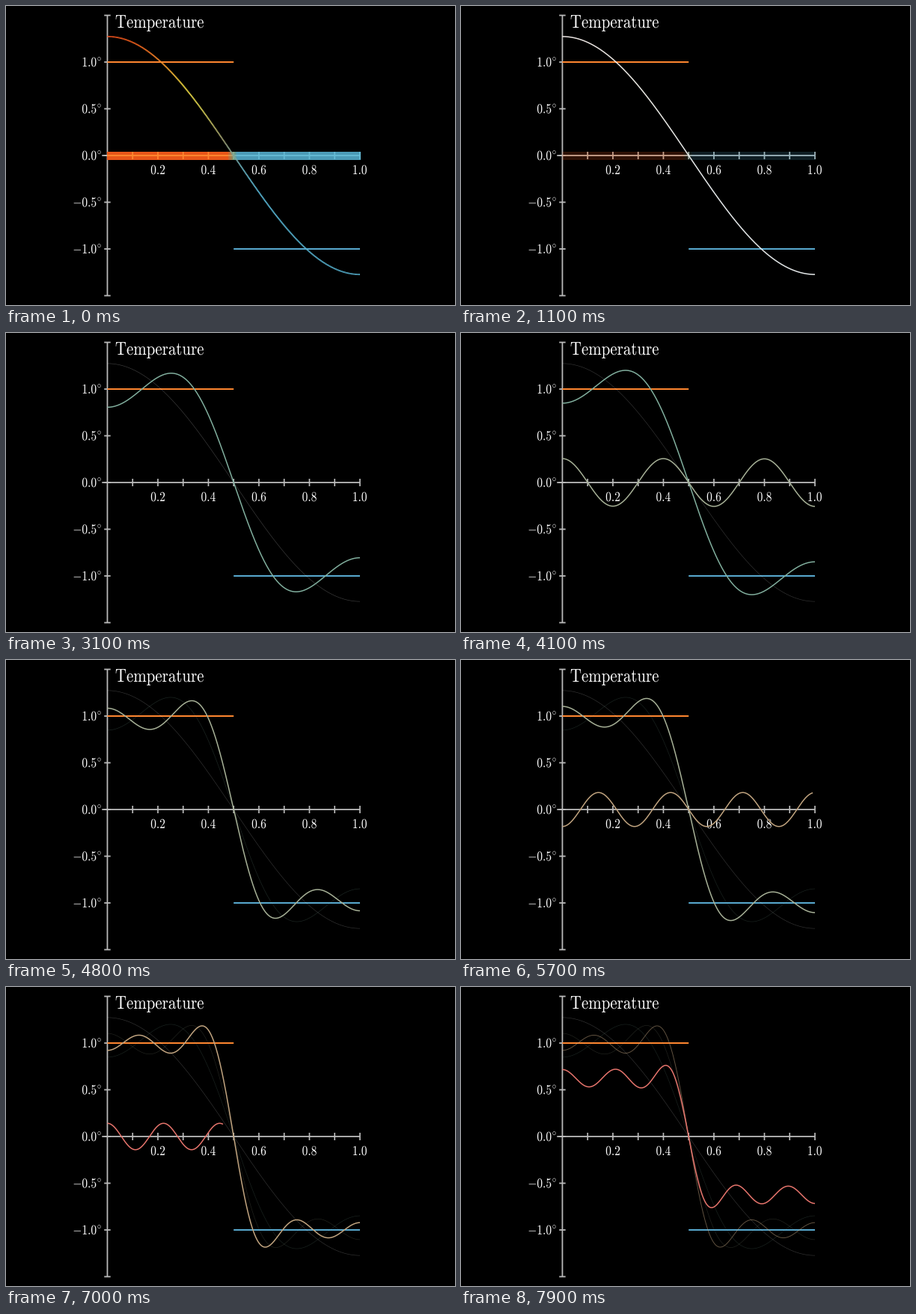
A matplotlib script that plays this animation: 600 px wide and 400 px high, repeating every 8 s.

```python
import numpy as np
import matplotlib as mpl
import matplotlib.pyplot as plt
from matplotlib.animation import FuncAnimation
from matplotlib.collections import LineCollection
from matplotlib.colors import to_rgb
from matplotlib.patches import PathPatch
from matplotlib.textpath import TextPath
from matplotlib.transforms import Affine2D

mpl.rcParams["mathtext.fontset"] = "cm"

FRAMES, STEP = 80, 100
X0, XLEN, YUNIT = -3.9, 8.0, 2.5
ORANGE, BLUE, GREY = "#FF862F", "#58A9CF", "#BBBBBB"
COLORS = ["#FFFFFF", "#82B09F", "#A8B298", "#C2A580", "#E8756D"]
DIM_ALPHA, DIM_WIDTH, WIDTH = 0.2, 0.65, 1.5

# A 16:9 scene, eight units high, shown on a 3:2 stage
fig = plt.figure(figsize=(6, 4), dpi=100, facecolor="black")
ax = fig.add_axes([0, 0, 1, 1])
ax.set_xlim(-64 / 9, 64 / 9)
ax.set_ylim(-4, 4)
ax.axis("off")


def px(n):
    return n * 0.72


def sx(x):
    return X0 + XLEN * np.asarray(x, float)


def sy(y):
    return YUNIT * np.asarray(y, float)


def scene_time(i):
    """Seconds since the second cosine began, on a 30 fps clock run at 1.2x."""
    ticks = -(-18 * (i - 19) // 5)
    return (ticks + 10.5) / 30


def smooth(t):
    t = np.clip(t, 0, 1)
    sig = lambda v: 1 / (1 + np.exp(-v))
    low = sig(-5)
    return float(np.clip((sig(10 * (t - 0.5)) - low) / (1 - 2 * low), 0, 1))


def line(x, y, color, width, z):
    return ax.plot(x, y, color=color, lw=px(width), zorder=z, snap=False,
                   solid_capstyle="butt", solid_joinstyle="round")[0]


def blend(x, stops):
    pos = [p for p, _ in stops]
    rgb = np.array([to_rgb(c) for _, c in stops])
    return np.stack([np.interp(x, pos, rgb[:, i]) for i in range(3)], axis=1)


def gradient_line(x, y, stops, width, z, smooth_edges=True):
    pts = np.stack([sx(x), sy(y)], axis=1)
    segs = np.stack([pts[:-1], pts[1:]], axis=1)
    lines = LineCollection(segs, colors=blend((x[:-1] + x[1:]) / 2, stops),
                           linewidths=px(width), zorder=z,
                           antialiaseds=smooth_edges)
    return ax.add_collection(lines)


def label(tex, x, y, size, align):
    path = TextPath((0, 0), f"${tex}$", size=size)
    box = path.get_extents()
    dx = {"left": box.x0, "center": (box.x0 + box.x1) / 2, "right": box.x1}[align]
    path = path.transformed(Affine2D().translate(x - dx, y))
    ax.add_patch(PathPatch(path, fc="white", ec="none", zorder=4))


def draw_axes():
    line([X0, X0], sy([-1.5, 1.5]), GREY, 1.8, 2)
    line([X0 - 0.17, sx(1)], [0, 0], GREY, 1.8, 2)
    for v in np.arange(-1.5, 1.6, 0.5):
        line([X0 - 0.1, X0 + 0.1], sy([v, v]), GREY, 1.8, 2)
        if abs(v) < 1.4:
            label(rf"{v:.1f}^{{\circ}}", X0 - 0.21, sy(v) - 0.12, 0.367, "right")
    for k in range(1, 11):
        x = sx(k / 10)
        line([x, x], [-0.1, 0.1], GREY, 1.7, 2)
        if k % 2 == 0:
            label(f"{k / 10:.1f}", x, -0.5, 0.367, "center")
    label(r"\mathrm{Temperature}", X0 + 0.265, 3.415, 0.496, "left")


def draw_rod(x):
    body = [(0, "#E8571A"), (0.475, "#E8571A"), (0.5, "#6F9A78"),
            (0.515, "#4C9CB8"), (1, "#4C9CB8")]
    core = [(0, "#FF8A30"), (0.475, "#FF8A30"), (0.5, "#8FB090"),
            (0.515, "#66BCD6"), (1, "#66BCD6")]
    ticks = np.arange(1, 11) / 10
    marks = ax.vlines(sx(ticks), -0.1, 0.1, colors=blend(ticks, core),
                      lw=px(1.7), zorder=3.2, snap=False)
    return [gradient_line(x, 0 * x, body, 10.5, 3, False),
            gradient_line(x, 0 * x, core, 1.8, 3.1), marks]


xs = np.linspace(0, 1, 401)
terms = []
for k in range(5):
    n = 2 * k + 1
    terms.append((-1) ** k * 4 / (n * np.pi) * np.cos(n * np.pi * xs))
sums = np.cumsum(terms, axis=0)

draw_axes()
line(sx([0, 0.5]), sy([1, 1]), ORANGE, 2, 4.5)
line(sx([0.5, 1]), sy([-1, -1]), BLUE, 2, 4.5)
heat = [(0, "#F4511E"), (0.12, "#FA661E"), (0.21, "#FF8F2C"), (0.3, "#F3DC40"),
        (0.37, "#D8D050"), (0.46, "#9A9A70"), (0.53, "#68ACB8"), (0.6, "#58B4D2"),
        (1, "#58B4D2")]
fading = draw_rod(xs) + [gradient_line(xs, terms[0], heat, 1.9, 5)]
curves = [line([], [], c, WIDTH, 6 + 0.1 * k) for k, c in enumerate(COLORS)]


def update(i):
    t = scene_time(i)
    intro = smooth((t + 2) / 2)
    for item in fading:
        item.set_alpha(1 - intro)
    for k, curve in enumerate(curves):
        # one second to draw, one to merge, and later one to dim
        local = t - 2 * (k - 1)
        drawn = smooth(local) if k else 1
        morph = smooth(local - 1)
        dim = smooth(local - 3)
        y = (1 - morph) * terms[k] + morph * sums[k]
        x = np.linspace(0, drawn, 401)
        curve.set_data(sx(x), sy(np.interp(x, xs, y)))
        curve.set_visible(drawn > 0)
        curve.set_alpha((1 - dim * (1 - DIM_ALPHA)) * (1 if k else intro))
        curve.set_linewidth(px(WIDTH + dim * (DIM_WIDTH - WIDTH)))
    return fading + curves


anim = FuncAnimation(fig, update, frames=FRAMES, interval=STEP,
                     repeat=True, repeat_delay=0, blit=False)
plt.show()
```
